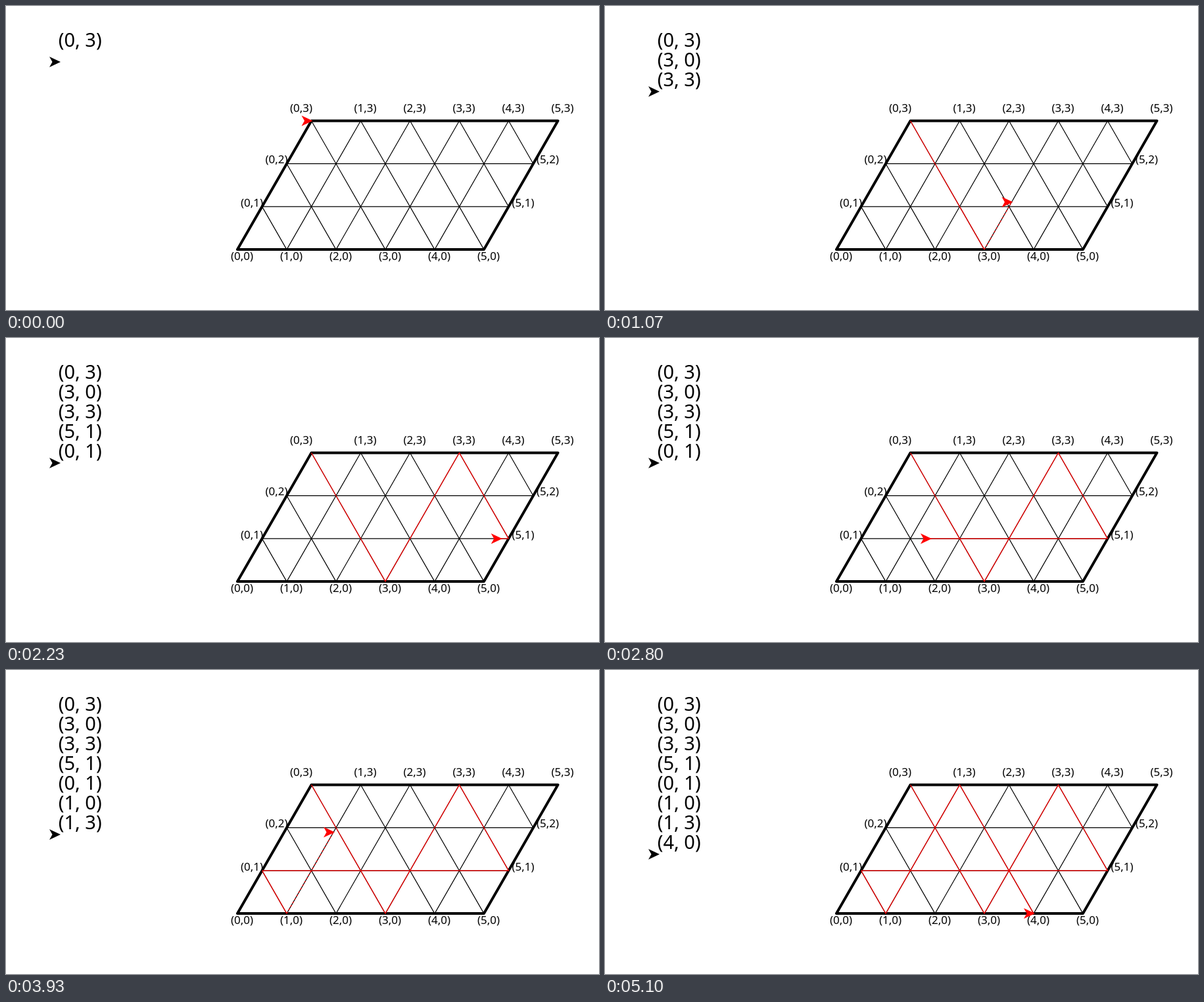
Animation of 902 by 462 pixels, one loop 5230 ms. Source, as an HTML page:

```html
<!DOCTYPE html>
<html lang="en">
<head>
<meta charset="utf-8">
<title>Path on a triangular lattice</title>
<style>
  html, body { margin: 0; width: 100%; height: 100%; overflow: hidden; background: #fff; }
  svg { display: block; font: 17px "Noto Sans", "Open Sans", sans-serif; }
  .line { fill: none; stroke: #000; stroke-width: 1.2; }
  .red { stroke: #f00; }
  .border { fill: none; stroke: #000; stroke-width: 4; stroke-linejoin: round; }
  .label { text-anchor: middle; }
  .entry { font-size: 29px; }
</style>
</head>
<body>
<svg id="stage" width="902" height="462" viewBox="0 0 902 462"></svg>
<script>
const LOOP = 5230, UNIT = 75, HOP = 11.979, ROW = 30;
const route = [[0, 3], [3, 0], [3, 3], [5, 1], [0, 1], [1, 0], [1, 3], [4, 0]];
// start, end and slowdown exponent of each leg
const legs = [
  [50, 760, 1.1], [860, 1510, 1.25], [1575, 2060, 1.25], [2195, 3030, 1],
  [3260, 3400, 1], [3455, 4205, 1], [4310, 5095, 1.25]
];

const stage = document.getElementById("stage");
const point = ([x, y]) => [352 + UNIT * x + UNIT / 2 * y, 370.1 - 65.2 * y];
const ARROW = "2,0 -15,-8 -10.5,0 -15,8";

function add(tag, attrs, text = "") {
  const el = document.createElementNS("http://www.w3.org/2000/svg", tag);
  for (const key in attrs) el.setAttribute(key, attrs[key]);
  el.textContent = text;
  return stage.appendChild(el);
}
const trace = (points, cls) =>
  add("polyline", { points: points.map(point).join(" "), class: cls });

// Grid
for (const y of [1, 2]) trace([[0, y], [5, y]], "line");
for (let x = 1; x < 5; x++) trace([[x, 0], [x, 3]], "line");
for (let s = 1; s < 8; s++) {
  const top = Math.min(s, 3), right = Math.min(s, 5);
  trace([[s - top, top], [right, s - right]], "line");
}
add("polygon", { points: [[0, 0], [5, 0], [5, 3], [0, 3]].map(point).join(" "), class: "border" });

const done = trace([], "line red");
const active = trace([], "line red");

// Labels around the border
function label(x, y, dx, dy) {
  const [px, py] = point([x, y]);
  add("text", { x: px + dx, y: py + dy, class: "label" }, `(${x},${y})`);
}
for (let x = 0; x < 6; x++) {
  label(x, 0, 7, 16);
  label(x, 3, x ? 7 : -15.5, -13.5);
}
for (const y of [1, 2]) {
  label(0, y, -15.5, -0.3);
  label(5, y, 22, -0.3);
}

const entries = route.map(([x, y], i) =>
  add("text", { x: 79.7, y: 62 + ROW * i, class: "entry" }, `(${x}, ${y})`));
const writer = add("polygon", { points: ARROW });
const walker = add("polygon", { points: ARROW, fill: "#f00" });

const place = (el, x, y) => el.setAttribute("transform", `translate(${x} ${y})`);

function draw(t) {
  let visited = 1, written = 1, half = t < 30 ? 1 : 2;
  let pos = route[0], moving = null;
  legs.forEach(([start, end, power], i) => {
    if (t < start) return;
    written = i + 2;
    const a = route[i], b = route[i + 1];
    const [ax, ay] = point(a), [bx, by] = point(b);
    const hops = 1 + Math.floor(Math.hypot(bx - ax, by - ay) / HOP);
    const progress = Math.min(1, (t - start) / (end - start));
    const f = Math.floor(hops * progress ** (1 / power) + 1e-6) / hops;
    pos = a.map((v, k) => v + (b[k] - v) * f);
    moving = f < 1 ? [a, pos] : null;
    if (f === 1) visited = i + 2;
    // the writer steps down one row in two hops after each leg but the last
    if (i < legs.length - 1)
      half = 2 * (i + 1) + (t >= end + 30) + (t >= end + 60);
  });
  done.setAttribute("points", route.slice(0, visited).map(point).join(" "));
  active.setAttribute("points", moving ? moving.map(point).join(" ") : "");
  const level = moving && moving[0][1] === moving[1][1];
  active.setAttribute("stroke-dasharray", level ? "none" : "3 3");
  entries.forEach((el, i) => el.setAttribute("visibility", i < written ? "visible" : "hidden"));
  place(writer, 81, 70 + ROW / 2 * half);
  place(walker, ...point(pos));
}

const origin = performance.now();
function tick() {
  draw((performance.now() - origin) % LOOP);
  requestAnimationFrame(tick);
}
tick();
</script>
</body>
</html>
```
